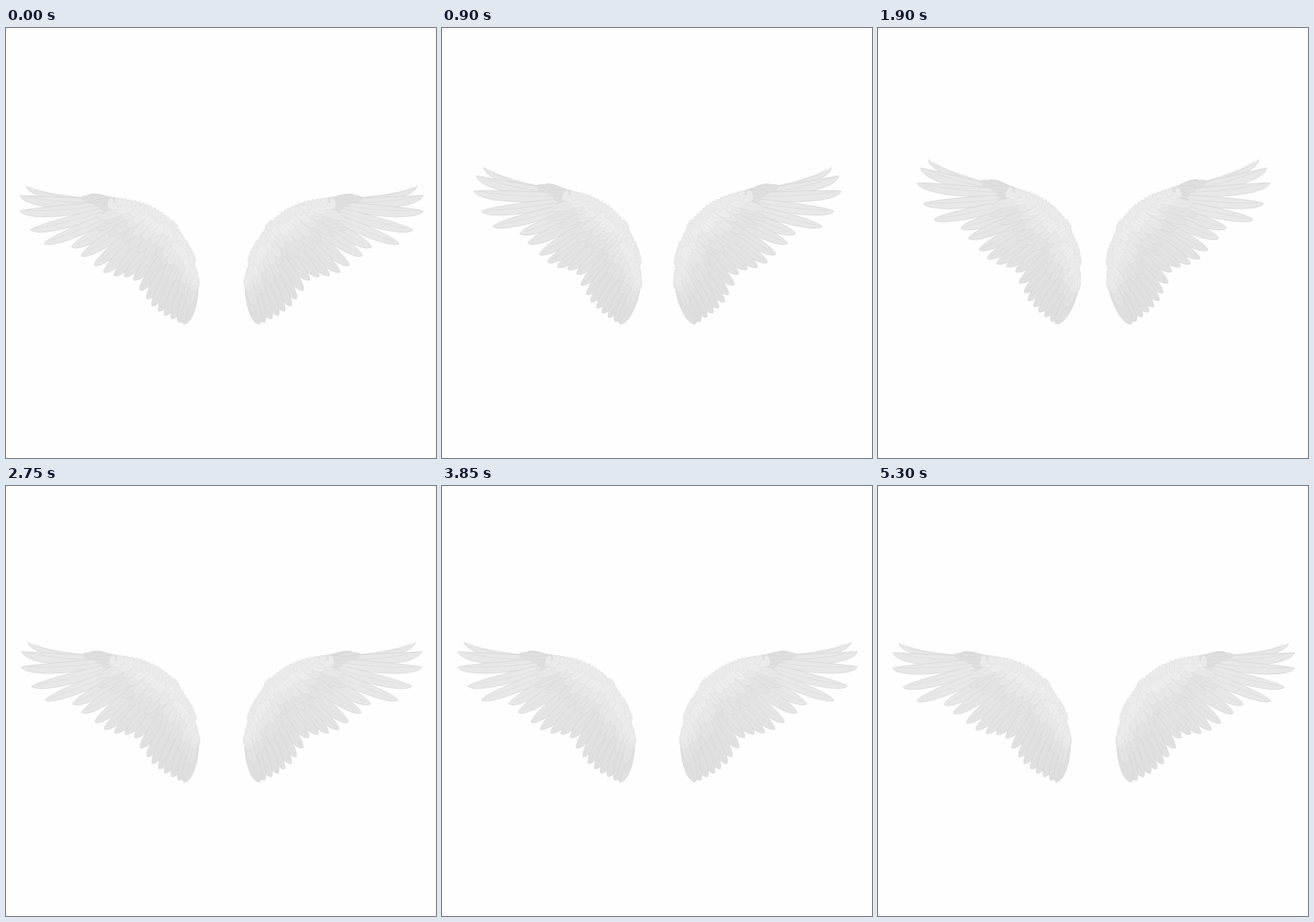
These frames come from a looping animation (498 px wide and 498 px high, 5350 ms). An HTML page:

```html
<!DOCTYPE html>
<html lang="en">
<head>
<meta charset="utf-8">
<title>Wings</title>
<style>
  html, body { margin: 0; width: 100%; height: 100%; overflow: hidden; background: #fefefe; }
  svg { display: block; width: 100vw; height: 100vh; }
</style>
</head>
<body>
<svg viewBox="0 0 498 498">
  <defs>
    <linearGradient id="vane" gradientUnits="userSpaceOnUse" x1="20" y1="200" x2="200" y2="330">
      <stop offset="0" stop-color="#e7e7e7"/>
      <stop offset=".35" stop-color="#e8e8e8"/>
      <stop offset=".6" stop-color="#e3e3e3"/>
      <stop offset="1" stop-color="#dfdfdf"/>
    </linearGradient>
    <g id="wing" stroke-linejoin="round"></g>
  </defs>
  <use id="left" href="#wing"/>
  <use id="right" href="#wing"/>
</svg>
<script>
const wing = document.getElementById('wing');
const left = document.getElementById('left');
const right = document.getElementById('right');

let seed = 7;
const random = () => (seed = seed * 16807 % 2147483647) / 2147483647;
const mix = (a, b, k) => a + (b - a) * k;
const mixPoint = (p, q, k) => [mix(p[0], q[0], k), mix(p[1], q[1], k)];

function addPath(d, fill, stroke, width) {
  const path = document.createElementNS('http://www.w3.org/2000/svg', 'path');
  path.setAttribute('d', d);
  path.setAttribute('fill', fill);
  path.setAttribute('stroke', stroke);
  path.setAttribute('stroke-width', width);
  wing.append(path);
}

function feather(base, tip, half, bend, fill, edge) {
  const dx = tip[0] - base[0], dy = tip[1] - base[1], len = Math.hypot(dx, dy);
  const at = (k, off) => [
    base[0] + dx * k - dy / len * off,
    base[1] + dy * k + dx / len * off
  ].map(v => v.toFixed(1)).join(' ');
  addPath(`M${at(0, 1)}C${at(.35, bend + half)} ${at(.95, bend + half)} ${at(1, 0)}` +
    `C${at(.95, bend - half)} ${at(.35, bend - half)} ${at(0, -1)}Z`, fill, edge, .7);
  addPath(`M${at(0, 0)}Q${at(.55, bend * 1.3)} ${at(.95, 0)}`, 'none', edge, .5);
}

// Leading edge from wrist to shoulder
function bone(t) {
  const u = 1 - t;
  const cubic = (a, b, c, d) => u * u * u * a + 3 * u * u * t * b + 3 * u * t * t * c + t * t * t * d;
  return [cubic(122, 178, 212, 220), cubic(199, 198, 235, 286)];
}

const tips = [
  [23, 183], [16, 194], [16, 212], [28, 234], [44, 250], [76, 254], [87, 264],
  [102, 275], [113, 283], [125, 287], [137, 288], [148, 292], [155, 304], [163, 314],
  [169, 322], [177, 328], [184, 333], [192, 337], [200, 341], [206, 343]
];
const last = tips.length - 1;

function tipAt(t) {
  const i = Math.min(last - 1, Math.floor(t * last));
  return mixPoint(tips[i], tips[i + 1], t * last - i);
}

function coverts(count, from, to, reach, half, fill, edge) {
  for (let i = 0; i < count; i++) {
    const t = mix(from, to, i / (count - 1));
    const base = bone(t);
    const tip = mixPoint(base, tipAt(t), reach * mix(.8, 1.15, random()));
    feather(base, tip, half, -1, fill, edge);
  }
}

function buildWing() {
  tips.forEach((tip, i) => {
    const half = i === 0 ? 4.5 : i < 5 ? 8 : 9;
    const bend = i < 5 ? -10 + i * 2 : -2;
    feather(bone(i / last), tip, half, bend, 'url(#vane)', '#d6d6d6');
  });
  coverts(7, 0, .28, .34, 6, '#dfdfdf', '#d7d7d7');
  coverts(14, .25, 1, .56, 7, '#e3e3e3', '#d9d9d9');
  coverts(14, .2, 1, .38, 7, '#e8e8e8', '#dedede');
  coverts(16, .15, 1, .24, 6, '#ededed', '#e2e2e2');
  // Downy tufts along the shoulder
  for (let i = 0; i < 30; i++) {
    const t = mix(0, 1, i / 29);
    const [x, y] = bone(t);
    const tip = [x + mix(-6, 5, random()), y + mix(4, 14, random())];
    feather([x, y - 2], tip, 4, 0, '#ececec', '#e4e4e4');
  }
}

// Alternating times of lowest and highest pose
const turns = [35, 667, 1305, 1938, 2640, 3300, 3965, 4657, 5385];
const loop = 5350, step = 50;

function liftAt(time) {
  const t = time < turns[0] ? time + loop : time;
  let i = 0;
  while (i < turns.length - 2 && t >= turns[i + 1]) i++;
  const k = (t - turns[i]) / (turns[i + 1] - turns[i]);
  const eased = .5 - .5 * Math.cos(Math.PI * k);
  return i % 2 ? 1 - eased : eased;
}

function render(time) {
  const lift = liftAt(Math.floor(time % loop / step) * step);
  const a = 1 - .005 * lift, b = .185 * lift, c = -.22 * lift, d = 1 - .02 * lift;
  const pose = `translate(207 343) matrix(${a} ${b} ${c} ${d} 0 0) translate(-207 -343)`;
  left.setAttribute('transform', pose);
  right.setAttribute('transform', `translate(499.5 0) scale(-1 1) ${pose}`);
}

buildWing();
render(0);
const start = performance.now();
function tick() {
  render(performance.now() - start);
  requestAnimationFrame(tick);
}
requestAnimationFrame(tick);
</script>
</body>
</html>
```
